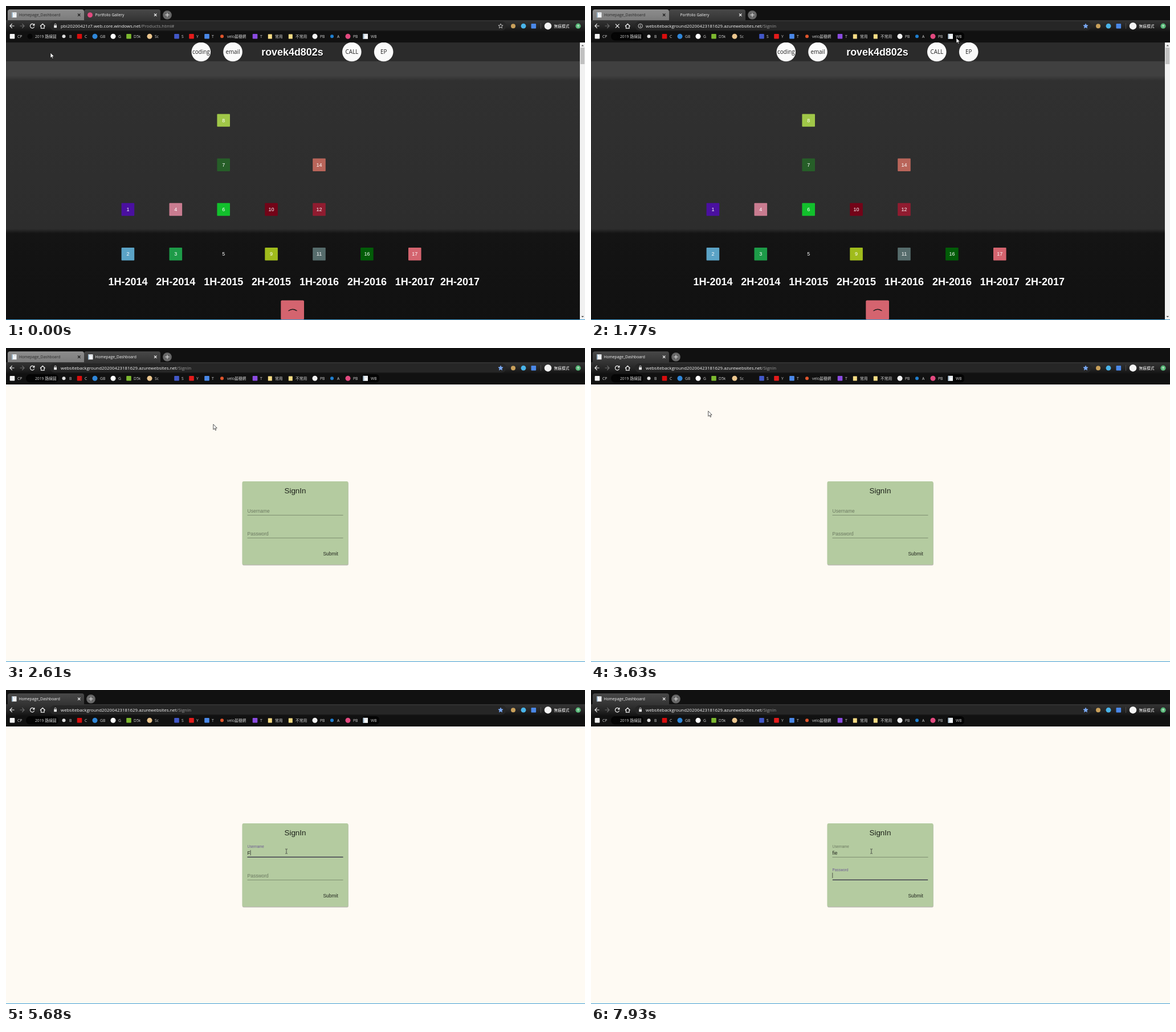
An HTML page for the animation above (8000 ms loop, 1016 by 551 pixels).

```html
<!DOCTYPE html>
<html lang="en">
<head>
<meta charset="utf-8">
<style>
html, body { margin: 0; width: 100%; height: 100%; overflow: hidden; background: #111; }
svg { display: block; width: 100vw; height: 100vh; }
text { font-family: "Open Sans", "Noto Sans CJK TC", "Noto Sans CJK", sans-serif; white-space: pre; }
.arial { font-family: "Liberation Sans", Arial, sans-serif; }
</style>
</head>
<body>
<svg id="stage" viewBox="0 0 1016 551"></svg>
<script>
const LOOP = 8000;
const LOAD = 1690, BLANK = 1860, READY = 2150, CLOSE = 3310, FOCUS = 4180, NEXT = 7800;

const rect = (x, y, w, h, fill, more = '') =>
  `<rect x="${x}" y="${y}" width="${w}" height="${h}" fill="${fill}" ${more}/>`;
const disc = (x, y, r, fill, more = '') => `<circle cx="${x}" cy="${y}" r="${r}" fill="${fill}" ${more}/>`;
const path = (d, stroke, width = 1.2, more = '') =>
  `<path d="${d}" fill="none" stroke="${stroke}" stroke-width="${width}" ${more}/>`;
const text = (x, y, size, fill, s, more = '') =>
  `<text x="${x}" y="${y}" font-size="${size}" fill="${fill}" ${more}>${s}</text>`;
const group = (id, body, more = '') => `<g id="${id}" ${more}>${body}</g>`;
const gradient = (id, y1, y2, stops) =>
  `<linearGradient id="${id}" gradientUnits="userSpaceOnUse" x1="0" x2="0" y1="${y1}" y2="${y2}">` +
  stops.map(([y, c]) => `<stop offset="${(y - y1) / (y2 - y1)}" stop-color="${c}"/>`).join('') +
  '</linearGradient>';
const ARIAL = 'class="arial"', CENTER = 'text-anchor="middle"', MIDDLE = `${ARIAL} ${CENTER}`;

const notepad = (x, y) => rect(x - 4, y - 4.5, 8.5, 9, '#f4f6f8') +
  rect(x - 4, y - 4.5, 2, 9, '#9fb9cc') + rect(x, y - 2.5, 3, 0.6, '#9ab');

// Browser window
function tab(id, fill, color, body) {
  return group(id,
    `<path d="M0 25V10Q0 6 4 6H130Q134 6 134 10V25Z" fill="url(#${fill})"/>` + body +
    path('M123 13.5l4.4 4.4m0 -4.4l-4.4 4.4', color, 1.1));
}

// icon x, shape, icon colour, label x, label
const bookmarks = [
  [11, 's', '#f2f2f2', 20, 'CP'], [42, 'c', '#050505', 51, '2019 路線圖'],
  [101.5, 't', '#ddd', 111, 'B'], [129, 's', '#d80d0d', 138, 'C'],
  [156, 'c', '#2f86d8', 165, 'GB'], [188, 'c', '#fff', 197, 'G'],
  [215.5, 's', '#7cb82f', 224, 'D5k'], [252, 'c', '#ecc68e', 261, 'Sc'],
  [299.5, 's', '#4258c8', 308, 'S'], [325.5, 's', '#e31b1b', 334, 'Y'],
  [352.5, 's', '#4a88e8', 361, 'T'], [379, 't', '#e0552c', 388, 'velo晨穗網'],
  [437, 's', '#8a4be0', 446, 'T'], [463, 'f', '#f7dc84', 472, '常用'],
  [499, 'f', '#f7dc84', 508, '不常用'], [542, 'c', '#f2f2f2', 551, 'PB'],
  [572, 't', '#1f7fd0', 581, 'A'], [600, 'c', '#e2497f', 609, 'PB'],
  [630.5, 'n', '', 640, 'WB']
];
const icons = {
  s: (x, c) => rect(x - 4.3, 49, 8.6, 8.6, c, 'rx="1"'),
  c: (x, c) => disc(x, 53.2, 4.5, c),
  t: (x, c) => disc(x, 53.2, 3, c),
  f: (x, c) => rect(x - 3.2, 49.5, 7, 8, c, 'rx=".6"'),
  n: x => notepad(x, 53.3)
};

const star = Array.from({ length: 10 }, (_, i) => {
  const a = i * Math.PI / 5, r = i % 2 ? 1.9 : 4.3;
  return `${868 + r * Math.sin(a)},${35.3 - r * Math.cos(a)}`;
}).join(' ');

const browser =
  rect(0, 0, 1016, 64, '#111') + rect(0, 25, 1016, 21, 'url(#toolbar)') +
  tab('oldTab', 'idle', '#1b1b1b', notepad(11, 15.7) + text(20, 18.2, 6.75, '#2b2b2b', 'Homepage_Dashboard')) +
  tab('mainTab', 'active', '#f2f2f2',
    group('siteIcon', disc(10.5, 15.7, 4.5, '#e2497f')) +
    group('spinner', path('M9 15.5a2.6 2.6 0 1 0 2.6 -2.6', '#777', 1)) +
    group('docIcon', notepad(11, 15.7)) +
    '<clipPath id="titleClip"><path d="M0 6H116V25H0Z"/></clipPath>' +
    text(19.5, 18.2, 6.75, '#f5f5f5', '', 'id="tabTitle" clip-path="url(#titleClip)"')) +
  group('plus', disc(0, 15.7, 7.8, '#686868') + path('M-3.6 15.7h7.2M0 12.1v7.2', '#e8e8e8', 1)) +
  path('M14.5 35H7M10.7 31.2L7 35l3.7 3.8', '#f2f2f2') +
  path('M24.5 35H32M28.3 31.2L32 35l-3.7 3.8', '#6c6c6c') +
  group('reload', path('M49.3 33.2A3.7 3.7 0 1 0 49.6 36.4M49.8 31v2.8h-2.8', '#f2f2f2')) +
  group('stop', path('M43 31.7l6.6 6.6m0 -6.6l-6.6 6.6', '#f2f2f2')) +
  path('M60 35.5L64.3 31.4L68.6 35.5M61.5 34.6V39.2H67.1V34.6', '#f2f2f2') +
  rect(77, 27, 801, 16, '#262626', 'rx="8"') +
  group('lock', rect(84.2, 34, 4.8, 4.2, '#eee') + path('M85.2 34v-1.4a1.4 1.4 0 0 1 2.8 0V34', '#eee', 0.9)) +
  group('info', disc(86.6, 35, 3.7, 'none', 'stroke="#ddd" stroke-width=".9"') +
    rect(86.1, 34.4, 1, 2.8, '#ddd') + rect(86.1, 32.6, 1, 1, '#ddd')) +
  '<text id="url" x="96" y="37.8" font-size="7.88" fill="#f5f5f5"><tspan id="host"></tspan><tspan id="page" fill="#9a9a9a"></tspan></text>' +
  `<polygon id="star" points="${star}" stroke-width=".8"/>` +
  disc(890, 35.2, 4, '#c9a05a') + disc(908, 35.2, 4.4, '#49b4ea') +
  rect(921.5, 31, 8.6, 8.6, '#4a88e8', 'rx="1"') + rect(938, 30, 0.8, 10, '#555') +
  disc(951, 35.2, 6.2, '#f4f4f4') + text(961.5, 37.9, 6.75, '#fff', '無痕模式') +
  disc(1004, 35.2, 4.6, '#58b878') + path('M1004 37.5v-4.2m-1.7 1.8l1.7 -1.8l1.7 1.8', '#fff', 0.8) +
  group('marks', rect(35, 46, 57, 14.5, '#040404', 'rx="7"') + rect(624, 46, 31, 14.5, '#040404', 'rx="6"')) +
  bookmarks.map(([x, shape, c, tx, s]) => icons[shape](x, c) + text(tx, 55.9, 6.75, '#d6d6d6', s)).join('');

// Timeline page
const column = i => 213.9 + i * 83.9;
const tiles = [
  [8, 2, 0, '#a0c748'], [7, 2, 1, '#265e28'], [14, 4, 1, '#b9655a'],
  [1, 0, 2, '#4a10a0'], [4, 1, 2, '#c97c90'], [6, 2, 2, '#12c02c'], [10, 3, 2, '#730418'], [12, 4, 2, '#901c30'],
  [2, 0, 3, '#5ba3c6'], [3, 1, 3, '#1d9b48'], [5, 2, 3, 'none'], [9, 3, 3, '#a0bc1c'],
  [11, 4, 3, '#566c6c'], [16, 5, 3, '#025c08'], [17, 6, 3, '#d4646f']
];
const badges = [[342.3, 'coding'], [398, 'email'], [606.8, 'CALL'], [662.7, 'EP']];
const timeline = group('timeline',
  rect(0, 64, 1007, 487, 'url(#night)') + rect(0, 64, 1007, 33, '#2b2b2b') +
  badges.map(([x, s]) => disc(x, 80.5, 16.8, '#fafafa') + text(x, 84.2, 9.9, '#222', s, CENTER)).join('') +
  text(503.2, 88, 17.9, '#000', 'rovek4d802s', `${MIDDLE} font-weight="bold"`) +
  text(502.4, 87, 17.9, '#fff', 'rovek4d802s', `${MIDDLE} font-weight="bold"`) +
  tiles.map(([n, col, row, c]) => {
    const x = column(col), y = 200.6 + row * 78.2;
    return rect(x - 11.3, y - 11.2, 22.6, 22.4, c, 'rx="1"') + text(x, y + 3, 9, '#fff', n, MIDDLE);
  }).join('') +
  Array.from({ length: 8 }, (_, i) =>
    text(i < 7 ? column(i) : 796.4, 490.3, 18, '#fff', `${i % 2 + 1}H-${2014 + (i >> 1)}`,
      `${MIDDLE} font-weight="bold"`)).join('') +
  rect(482.3, 516.5, 40.7, 34, '#d4646f', 'rx="2"') + path('M495.5 535Q503 529.5 510.5 535', '#1c1c1c', 1.3) +
  rect(1007, 64, 9, 487, '#f1f1f1') + rect(1008, 73, 7.2, 29, '#c1c1c1') +
  '<path d="M1009.5 70.5h4.6l-2.3 -2.6zM1009.5 544h4.6l-2.3 2.6z" fill="#555"/>');

// Sign-in page
const field = (id, y, label) =>
  rect(423.5, y + 4.3, 168, 0.7, '#66745b') + rect(423.5, y + 4, 168, 1.2, '#312c45', `id="${id}Bar"`) +
  text(0, 0, 8.47, '#6b7860', label, `id="${id}Label" ${ARIAL}`);
const signIn =
  rect(0, 64, 1016, 487, '#fefaf3') +
  group('form',
    rect(414.8, 235.2, 186, 146.2, '#000', 'rx="2.5" opacity=".28"') +
    rect(414.5, 234, 186, 146.3, '#b4cba0', 'rx="2.5"') +
    text(507.5, 255.4, 13.4, '#1d211a', 'SignIn', MIDDLE) +
    field('user', 288.6, 'Username') + field('pass', 328.6, 'Password') +
    text(423.6, 288.6, 8.47, '#20241d', '', `id="typed" ${ARIAL}`) +
    rect(0, 0, 0.7, 9.4, '#222', 'id="caret"') +
    text(569.6, 363.9, 8.47, '#20241d', 'Submit', MIDDLE));

document.getElementById('stage').innerHTML = '<defs>' +
  gradient('toolbar', 25, 46, [[25, '#343434'], [36, '#252525'], [46, '#111']]) +
  gradient('idle', 6, 25, [[6, '#8d8d8d'], [25, '#7b7b7b']]) +
  gradient('active', 6, 25, [[6, '#484848'], [25, '#343434']]) +
  gradient('night', 64, 551, [[64, '#404040'], [122, '#404040'], [131, '#303030'], [391, '#2d2d2d'],
    [399, '#141414'], [551, '#111']]) + '</defs>' +
  signIn + timeline + browser + rect(0, 550, 1016, 1, '#3f9ed6') +
  group('arrow', '<path d="M0 0V9.2L2.1 7.3L3.6 10.6L5 10L3.6 6.8L6.4 6.6Z" fill="#fff" stroke="#111" stroke-width=".7"/>') +
  group('beam', path('M-2 -4h1.5l.5 .5l.5 -.5H2M0 -3.5V3.5M-2 4h1.5l.5 -.5l.5 .5H2', '#333', 0.8));

const el = Object.fromEntries([...document.querySelectorAll('#stage [id]')].map(e => [e.id, e]));
const set = (id, attrs) => Object.entries(attrs).forEach(([k, v]) => el[id].setAttribute(k, v));
const show = (id, on) => set(id, { visibility: on ? 'visible' : 'hidden' });
const clamp = v => Math.max(0, Math.min(1, v));
const ease = (t, start, length) => 1 - (1 - clamp((t - start) / length)) ** 3;
const mix = (a, b, p) => a + (b - a) * p;

const route = [
  [80, 78, 82], [330, 230, 52], [480, 370, 40], [850, 632, 83], [1150, 659, 53], [1410, 641, 56],
  [2150, 641, 56], [2430, 548, 152], [2610, 355, 133], [2960, 116, 44], [3270, 127, 14],
  [3380, 127, 14], [3630, 206, 111], [3900, 470, 297], [4080, 492, 283]
];
function pointer(t) {
  const i = route.findIndex(p => p[0] >= t);
  if (i === 0) return route[0].slice(1);
  if (i < 0) return route.at(-1).slice(1);
  const [a, b] = [route[i - 1], route[i]];
  const p = (t - a[0]) / (b[0] - a[0]);
  return [mix(a[1], b[1], p), mix(a[2], b[2], p)];
}

const typing = [[0, ''], [5680, 'F'], [6140, 'Fi'], [6510, 'F'], [6710, ''], [7070, 'f'], [7350, 'fi'], [7630, 'fie']];

function drawField(id, y, float, bar, focused) {
  const s = mix(1, 0.75, float);
  set(id + 'Label', {
    transform: `translate(423.6 ${y - mix(0, id === 'user' ? 12.1 : 10.8, float)}) scale(${s})`,
    fill: focused ? '#6d5a92' : '#6b7860'
  });
  set(id + 'Bar', { x: 507.5 - 84 * bar, width: 168 * bar });
}

function draw(t) {
  const loaded = t >= LOAD, blank = t >= BLANK, ready = t >= READY;
  show('timeline', !blank);
  set('form', { display: ready ? 'inline' : 'none' });
  show('marks', loaded);
  show('siteIcon', !loaded);
  show('spinner', blank && !ready);
  show('docIcon', ready);
  show('stop', loaded && !ready);
  show('reload', !loaded || ready);
  show('info', loaded && !blank);
  show('lock', !loaded || blank);
  set('star', { fill: loaded ? '#7aa9f5' : 'none', stroke: loaded ? '#7aa9f5' : '#ddd' });
  el.host.textContent = loaded ? 'websitebackground20200423181629.azurewebsites.net' : 'pbi20200421z7.web.core.windows.net';
  el.page.textContent = loaded ? '/SignIn' : '/Products.html#';
  el.tabTitle.textContent = ready ? 'Homepage_Dashboard' : blank ? 'https://websitebackground202' : 'Portfolio Gallery';

  // Pointer and tabs refresh about eleven times a second
  const tick = t < 80 ? t : 80 + Math.floor((t - 80) / 93.4 + 0.05) * 93.4;
  const slide = ease(tick, CLOSE, 260);
  set('oldTab', { transform: 'translate(3 0)' });
  show('oldTab', slide < 1);
  set('mainTab', { transform: `translate(${mix(137, 3, slide)} 0)` });
  set('plus', { transform: `translate(${mix(283, 149, slide)} 0)` });

  const [x, y] = pointer(t >= 4080 ? t : tick);
  const inField = ready && x > 423 && x < 592 && y > 274 && y < 293;
  show('arrow', !inField);
  show('beam', inField);
  set(inField ? 'beam' : 'arrow', { transform: `translate(${x} ${y})` });

  const moved = t >= NEXT;
  drawField('user', 288.6, ease(t, FOCUS, 160), moved ? 0 : ease(t, FOCUS, 250), t >= FOCUS && !moved);
  drawField('pass', 328.6, ease(t, NEXT, 140), ease(t, NEXT, 160), moved);
  el.typed.textContent = typing.findLast(k => t >= k[0])[1];
  const width = el.typed.textContent && ready ? el.typed.getComputedTextLength() : 0;
  set('caret', { x: moved ? 423.5 : 423.5 + width, y: moved ? 320.6 : 280.8 });
  set('caret', { opacity: t >= 4220 && (t < 4750 || t >= 5300) ? 1 : 0 });
}

const start = performance.now();
function frame() {
  draw((performance.now() - start) % LOOP);
  requestAnimationFrame(frame);
}
frame();
</script>
</body>
</html>
```
